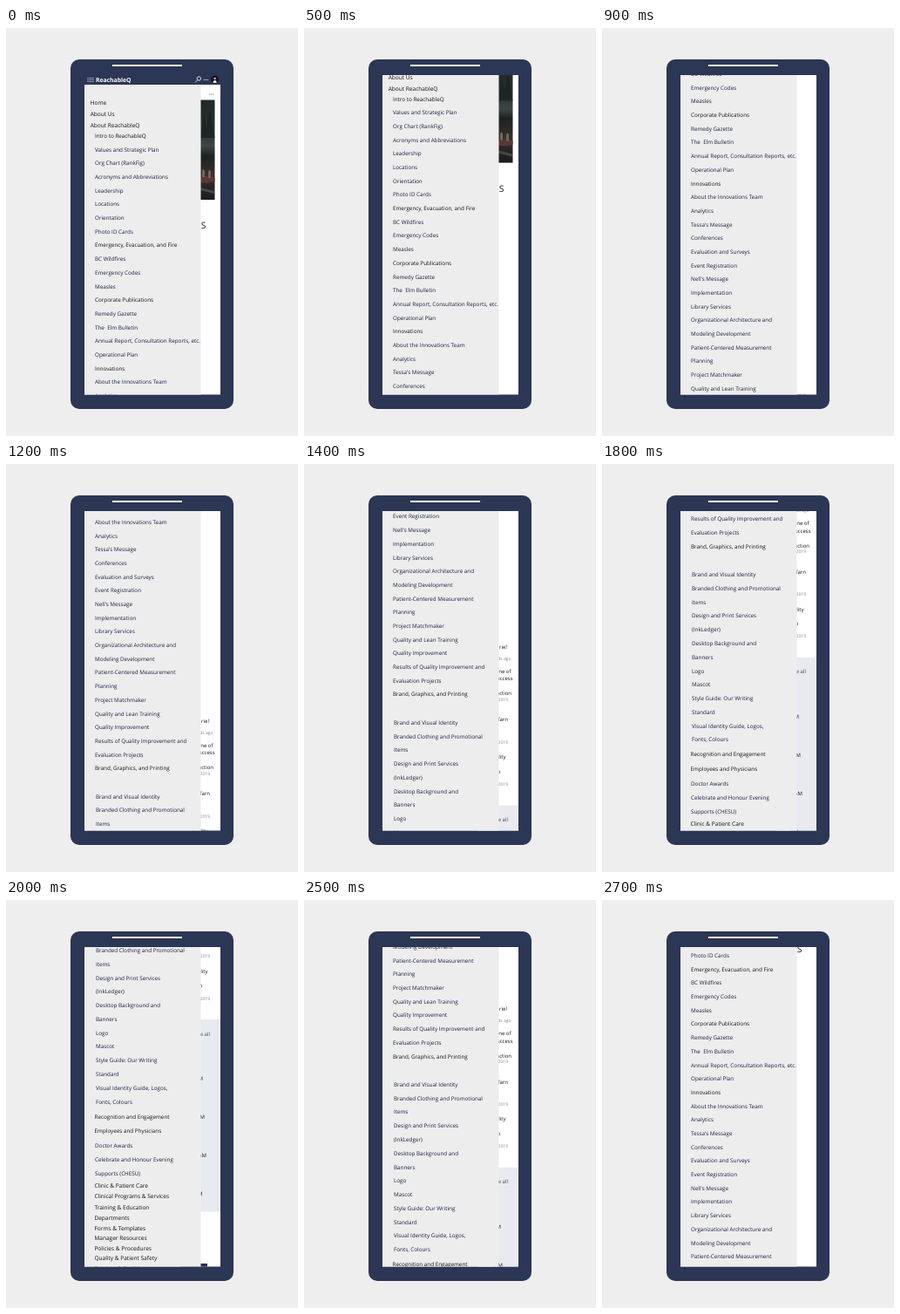
Recreate the animation shown at these times as an HTML page. Size 335 by 468 pixels, loop 2800 ms.

```html
<!DOCTYPE html>
<html lang="en">
<head>
<meta charset="utf-8">
<title>Scrolling menu</title>
<style>
  html, body { margin: 0; width: 100%; height: 100%; overflow: hidden; background: #eee; }
  svg { display: block; width: 100vw; height: 100vh; }
  text { font-family: "Open Sans", "Noto Sans", sans-serif; white-space: pre; text-rendering: geometricPrecision; }
</style>
</head>
<body>
<svg viewBox="0 0 335 468" xmlns="http://www.w3.org/2000/svg">
  <defs>
    <clipPath id="screen"><rect x="90" y="54" width="156" height="366.5"/></clipPath>
    <linearGradient id="forest" x1="0" y1="0" x2="0" y2="1">
      <stop offset="0" stop-color="#1f2a27"/>
      <stop offset=".3" stop-color="#26312f"/>
      <stop offset=".46" stop-color="#3c4745"/>
      <stop offset=".56" stop-color="#1c2222"/>
      <stop offset=".75" stop-color="#3a2f2c"/>
      <stop offset="1" stop-color="#181c1e"/>
    </linearGradient>
  </defs>
  <rect width="335" height="468" fill="#eee"/>
  <rect x="74" y="36" width="187" height="401" rx="10" fill="#2c3655"/>
  <rect x="122" y="42" width="80" height="2" fill="#fff"/>
  <g clip-path="url(#screen)">
    <rect x="90" y="54" width="156" height="367" fill="#fff"/>
    <g id="page">
      <g id="side">
        <rect x="200" y="82.5" width="39.5" height="114.5" fill="url(#forest)"/>
        <path d="M223 126l4-26 3 14 4-20 5.500 32z" fill="#17201e" opacity=".7"/>
        <path d="M223 172q8-4 16.500 0v4q-8 3-16.500 1z" fill="#5a3833"/>
        <path d="M225 171v-7q1.500-4 3 0v7zM232 172v-7q1.500-4 3 0v7z" fill="#6f665f"/>
        <path d="M223 183l16 4v3l-16-4z" fill="#4d4743"/>
        <rect x="200" y="816" width="46" height="220.500" fill="#e8eaf0"/>
        <rect x="200" y="1096" width="31" height="40" fill="#27304f"/>
      </g>
      <rect x="90" y="60" width="133.500" height="1200" fill="#ededed"/>
      <g id="menu"></g>
      <rect x="90" y="50" width="156" height="15" fill="#2c3655"/>
      <path d="M93 57.500h8M93 59.500h8M93 61.500h8" stroke="#aeb4c4" stroke-width=".7"/>
      <g id="bar"></g>
      <g fill="none" stroke="#fff" stroke-width=".8">
        <circle cx="221.300" cy="58" r="2.200"/><path d="M219.700 59.700l-2.500 2.700"/>
      </g>
      <g fill="#fff">
        <circle cx="227.300" cy="59.300" r=".6"/><circle cx="229.300" cy="59.300" r=".6"/><circle cx="231.300" cy="59.300" r=".6"/>
      </g>
      <circle cx="239.500" cy="59" r="4.500" fill="#11141d"/>
      <path d="M237.600 63q0-3 2-3t2 3z" fill="#e9e6e3"/>
      <circle cx="239.600" cy="58" r="1.300" fill="#c9aea2"/>
      <g fill="#444">
        <circle cx="233.800" cy="76" r=".55"/><circle cx="235.700" cy="76" r=".55"/><circle cx="237.600" cy="76" r=".55"/>
      </g>
    </g>
  </g>
</svg>
<script>
const NAVY = '#182040', DARK = '#121318', GREY = '#808080';
const $ = id => document.getElementById(id);

function label(parent, str, x, mid, size, fill, extra = {}) {
  const el = document.createElementNS('http://www.w3.org/2000/svg', 'text');
  const attrs = { x, y: mid + size * 0.36, 'font-size': size, fill, ...extra };
  for (const key in attrs) el.setAttribute(key, attrs[key]);
  el.textContent = str;
  parent.appendChild(el);
}

// A leading * marks a darker heading.
function list(str, x, top, pitch, size = 6.3) {
  str.split('|').forEach((item, i) => {
    const head = item[0] === '*';
    label($('menu'), head ? item.slice(1) : item, x, top + i * pitch, size, head ? DARK : NAVY);
  });
}

list('*Home|*About Us|*About ReachableQ', 96.7, 85.4, 13.3, 6.55);
list('*Intro to ReachableQ|Values and Strategic Plan|Org Chart (RankFig)|Acronyms and Abbreviations|' +
  'Leadership|Locations|Orientation|Photo ID Cards|*Emergency, Evacuation, and Fire|BC Wildfires|' +
  'Emergency Codes|Measles|*Corporate Publications|Remedy Gazette|The  Elm Bulletin|' +
  'Annual Report, Consultation Reports, etc.|Operational Plan|*Innovations|About the Innovations Team|' +
  "Analytics|Tessa's Message|Conferences|Evaluation and Surveys|Event Registration|Nell's Message|" +
  'Implementation|Library Services|Organizational Architecture and|Modeling Development|' +
  'Patient-Centered Measurement|Planning|Project Matchmaker|Quality and Lean Training|' +
  'Quality Improvement|Results of Quality Improvement and|Evaluation Projects|*Brand, Graphics, and Printing',
  102, 123.7, 15.69);
list('Brand and Visual Identity|Branded Clothing and Promotional|Items|Design and Print Services|' +
  '(InkLedger)|Desktop Background and|Banners|Logo|Mascot|Style Guide: Our Writing|Standard|' +
  'Visual Identity Guide, Logos,|Fonts, Colours', 103, 720.9, 15.78);
list('*Recognition and Engagement|*Employees and Physicians', 101.6, 927.3, 16.1);
list('Doctor Awards|Celebrate and Honour Evening|Supports (CHESU)', 102, 960.8, 15.8);
list('*Clinic & Patient Care|*Clinical Programs & Services|*Training & Education', 101.4, 1006.4, 12.7, 6.55);
list('*Departments|*Forms & Templates|*Manager Resources|*Policies & Procedures|' +
  '*Quality & Patient Safety|*Services & Facilities', 101.4, 1043.7, 11.6, 6.55);

label($('bar'), 'ReachableQ', 103, 59.2, 6.8, '#fff', { 'font-weight': 700 });

// Right column: text, right edge, middle; only its tail shows beside the menu.
const tail = (str, x, y, size = 6, fill = DARK) =>
  label($('side'), str, x, y, size, fill, { 'text-anchor': 'end' });
tail('S', 229.4, 226.3, 10.3);
tail('rie!', 233, 634.5);
tail('ds ago', 237.5, 647.5, 5, GREY);
tail('one of', 237.5, 662.3);
tail('success', 239.5, 670.7);
tail('action', 238, 687.7);
tail('Tarn', 234, 717.7);
tail('quality', 231.5, 760.5);
tail('to', 225.3, 777);
for (const y of [694.5, 743.5, 791.7]) tail('2019', 234, y, 5, GREY);
tail('See all', 234, 832.4, 6, '#444');
[[225.8, 883.6], [228, 927.6], [229.8, 972], [225.3, 1015.6]].forEach(([x, y]) => tail('AM', x, y));

const LOOP = 2800, TICK = 100, END = 679;

function scrollAt(t) {
  if (t < 500) return 0;
  if (t < 2500) return END * Math.min(16, Math.floor((t - 500) / TICK) + 1) / 16;
  return END * (3 - Math.floor((t - 2500) / TICK)) / 4;
}

const start = performance.now();
function draw(now) {
  const t = Math.max(0, now - start) % LOOP;
  $('page').setAttribute('transform', `translate(0 ${-scrollAt(t)})`);
  requestAnimationFrame(draw);
}
draw(start);
</script>
</body>
</html>
```
